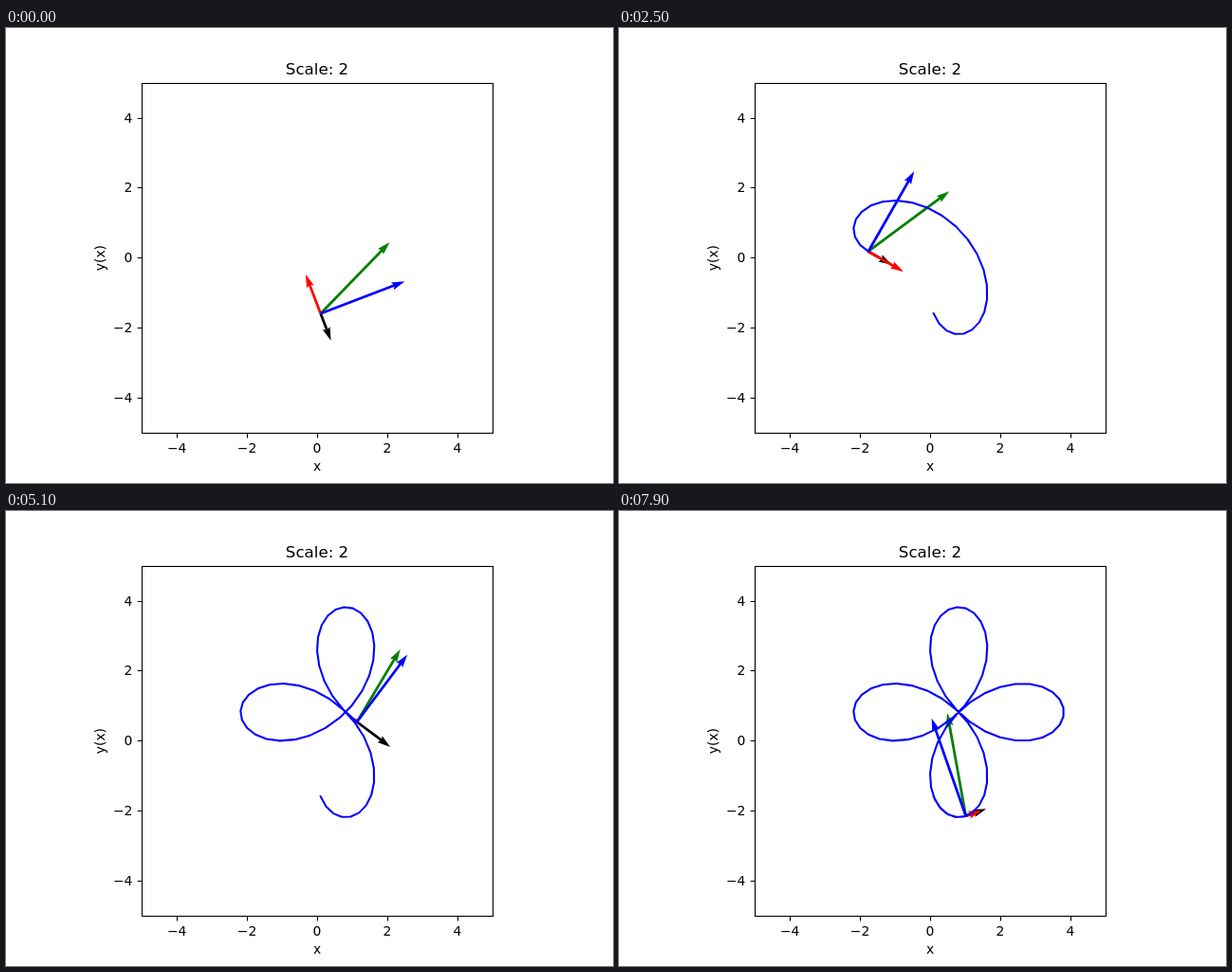
An HTML page that plays this animation: 640x480 px, repeating every 8000 ms.

```html
<!DOCTYPE html>
<html lang="en">
<head>
<meta charset="utf-8">
<title>Vectors along a rose curve</title>
<style>
  html, body { margin: 0; width: 100%; height: 100%; overflow: hidden; background: #fff; }
  svg { display: block; width: 640px; height: 480px; }
  text { font: 13.89px "DejaVu Sans", sans-serif; text-anchor: middle; }
  .title { font-size: 16.67px; }
  .end { text-anchor: end; }
  .axes { fill: none; stroke: #000; stroke-width: 1.11; }
  #trail {
    fill: none; stroke: #00f; stroke-width: 2.083;
    stroke-linejoin: round; stroke-linecap: square;
  }
</style>
</head>
<body>
<svg viewBox="0 0 640 480">
  <g id="arrows">
    <path id="velocity" fill="#000"/>
    <path id="acceleration" fill="#008000"/>
    <path id="tangential" fill="#f00"/>
    <path id="normal" fill="#00f"/>
  </g>
  <path id="trail"/>
  <rect class="axes" x="143.5" y="58.5" width="370" height="369"/>
  <path id="ticks" class="axes"/>
  <g id="labels">
    <text class="title" x="328" y="49">Scale: 2</text>
    <text x="328" y="467">x</text>
    <text transform="translate(103.6 242.6) rotate(-90)">y(x)</text>
  </g>
</svg>
<script>
const FRAMES = 80, FRAME_MS = 100;
const UNIT = 36.96, X0 = 328, Y0 = 242.4;
const CENTER = Math.sqrt(2 / 3);
const RADIUS = 3;
const STEP = 8 * Math.PI / 299, FIRST = 90;
const VECTOR_SCALE = 0.2;
const SHAFT = 0.0075 * 10 * UNIT;

const el = id => document.getElementById(id);
const px = x => X0 + UNIT * x;
const py = y => Y0 - UNIT * y;
const fix = v => v.toFixed(2);

function drawAxes() {
  let ticks = "";
  const label = (text, x, y, cls) => {
    const node = document.createElementNS("http://www.w3.org/2000/svg", "text");
    node.setAttribute("x", x);
    node.setAttribute("y", y);
    if (cls) node.setAttribute("class", cls);
    node.textContent = text;
    el("labels").append(node);
  };
  for (let v = -4; v <= 4; v += 2) {
    const x = Math.round(px(v)) + 0.5, y = Math.round(py(v)) + 0.5;
    const text = String(v).replace("-", "\u2212");
    ticks += `M${x} 427.5V432.4M143.5 ${y}H138.6`;
    label(text, px(v), 448, "");
    label(text, 133.4, y + 4.6, "end");
  }
  el("ticks").setAttribute("d", ticks);
}

// Position, velocity and acceleration on r = R cos(2a)
function state(n) {
  const a = (FIRST + n) * STEP;
  const cos = Math.cos(a), sin = Math.sin(a);
  const r = RADIUS * Math.cos(2 * a);
  const dr = -2 * RADIUS * Math.sin(2 * a);
  const toXY = (radial, angular) =>
    [radial * cos - angular * sin, radial * sin + angular * cos];
  const pos = toXY(r, 0).map(v => v + CENTER);
  const vel = toXY(dr, r);
  const acc = toXY(-5 * r, 2 * dr);
  const k = (acc[0] * vel[0] + acc[1] * vel[1]) / (vel[0] ** 2 + vel[1] ** 2);
  const tan = vel.map(v => v * k);
  const nor = acc.map((v, i) => v - tan[i]);
  return { pos, vel, acc, tan, nor };
}

// Arrow outline; arrows shorter than the head shrink as a whole
function arrow(id, [x, y], [u, v]) {
  const len = Math.hypot(u, v) * VECTOR_SCALE * UNIT / SHAFT;
  const dir = Math.atan2(-v, u);
  const full = Math.max(len, 5);
  const size = SHAFT * Math.min(1, len / 5);
  let outline = [
    [0, 0.5], [full - 4.5, 0.5], [full - 5, 1.5], [full, 0],
    [full - 5, -1.5], [full - 4.5, -0.5], [0, -0.5]
  ].map(p => p.map(c => c * size));
  if (len < 1) {
    outline = Array.from({ length: 6 }, (_, i) =>
      [Math.cos(i * Math.PI / 3), Math.sin(i * Math.PI / 3)].map(c => c * SHAFT / 2));
  }
  const c = Math.cos(dir), s = Math.sin(dir);
  const points = outline.map(([a, b]) =>
    fix(px(x) + a * c - b * s) + " " + fix(py(y) + a * s + b * c));
  el(id).setAttribute("d", "M" + points.join("L") + "Z");
}

const path = Array.from({ length: FRAMES }, (_, n) => state(n));
const pathPoints = path.map(({ pos }) => fix(px(pos[0])) + " " + fix(py(pos[1])));

function draw(n) {
  const { pos, vel, acc, tan, nor } = path[n];
  arrow("velocity", pos, vel);
  arrow("acceleration", pos, acc);
  arrow("tangential", pos, tan);
  arrow("normal", pos, nor);
  el("trail").setAttribute("d", n ? "M" + pathPoints.slice(0, n + 1).join("L") : "");
}

const start = performance.now();
function tick() {
  const t = Math.max(0, performance.now() - start);
  draw(Math.floor(t / FRAME_MS) % FRAMES);
  requestAnimationFrame(tick);
}

drawAxes();
tick();
</script>
</body>
</html>
```
